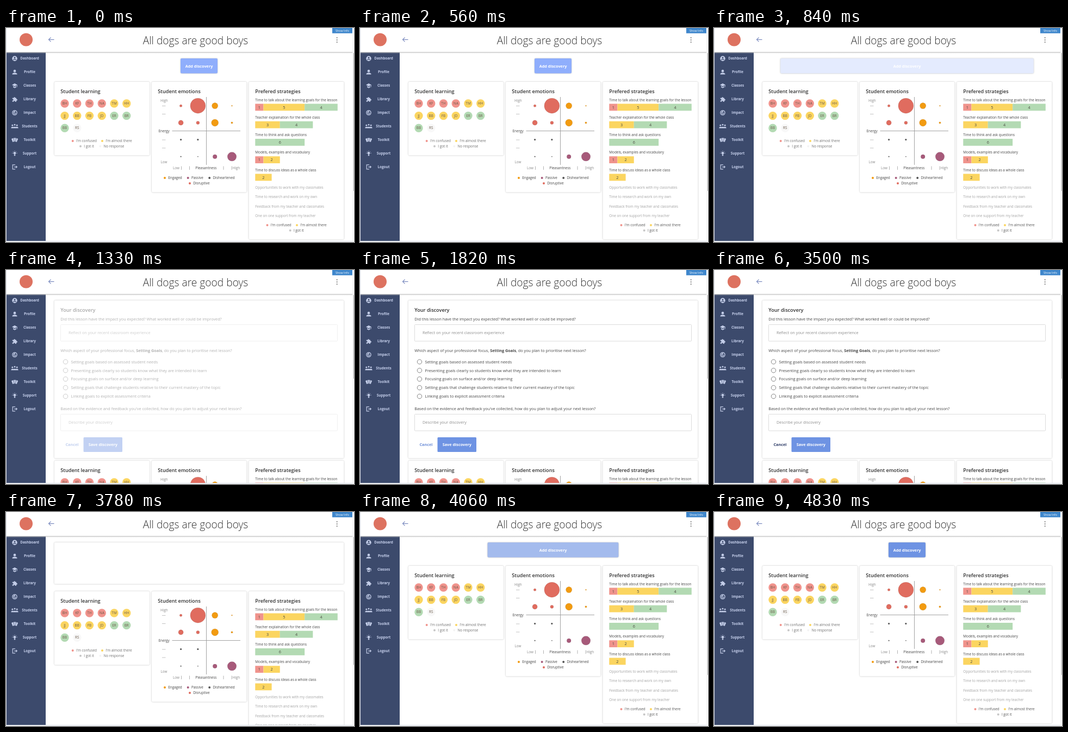
An HTML page for the animation above (4.9 s loop, 640 px wide and 394 px high).

```html
<!DOCTYPE html>
<html lang="en">
<head>
<meta charset="utf-8">
<title>Lesson discovery</title>
<style>
  html, body { margin: 0; width: 100%; height: 100%; overflow: hidden; background: #fff; }
  svg { display: block; width: 640px; height: 394px; }
  text { font-family: "Open Sans", sans-serif; }
  .card { fill: #fff; filter: drop-shadow(0 .7px .9px rgba(0, 0, 0, .28)); }
  .icon * { fill: none; stroke: #c3cde8; stroke-width: 1.2; }
  .icon .solid { fill: #c3cde8; stroke: none; }
</style>
</head>
<body>
<svg id="stage" viewBox="0 0 640 394">
  <defs>
    <clipPath id="page"><rect x="73" y="44" width="565" height="348"/></clipPath>
    <linearGradient id="edge" x2="0" y2="1">
      <stop stop-color="#c4c4c4"/><stop offset="1" stop-color="#c4c4c4" stop-opacity="0"/>
    </linearGradient>
  </defs>
</svg>
<script>
const RED = '#f0938c', YELLOW = '#fbd560', GREEN = '#b3dab3';
const CORAL = '#e06c5f', ORANGE = '#f29b11', PLUM = '#a75a7a', DARK = '#555';
const IDLE = [110, 147, 227], HOVER = [143, 174, 252];

// Text is placed by the middle of its capitals.
const text = (x, y, str, { size = 6.4, fill = '#464646', weight = 400, anchor = 'start', id = '' } = {}) =>
  `<text x="${x}" y="${y + size * .357}" font-size="${size}" fill="${fill}" font-weight="${weight}"
    text-anchor="${anchor}" ${id && `id="${id}"`}>${str}</text>`;
const heading = (x, y, str) => text(x, y, str, { size: 9.143, weight: 600, fill: '#303030' });
const formText = (x, y, str, fill = '#464646') => text(x, y, str, { size: 7.314, fill });
const buttonText = (x, y, str, fill, id) =>
  text(x, y, str, { size: 7.314, weight: 700, anchor: 'middle', fill, id });
const circle = (x, y, r, fill, extra = '') => `<circle cx="${x}" cy="${y}" r="${r}" fill="${fill}" ${extra}/>`;
const rect = (x, y, w, h, fill, extra = '') =>
  `<rect x="${x}" y="${y}" width="${w}" height="${h}" fill="${fill}" ${extra}/>`;
const line = (x1, y1, x2, y2, color) => `<path d="M${x1} ${y1}L${x2} ${y2}" stroke="${color}" stroke-width=".9"/>`;
const card = (x, y, w, h) => `<rect class="card" x="${x}" y="${y}" width="${w}" height="${h}" rx="2"/>`;
const legend = (x, y, color, str, fill = '#6f6f6f') => circle(x, y, 2, color) + text(x + 6.2, y, str, { fill });

function learningCard() {
  const rows = ['BH KF TH NA TM HH', 'JJ BB FB JD ER BR', 'BB RS'];
  const students = rows.flatMap((row, r) => row.split(' ').map((name, c) => {
    const index = r * 6 + c;
    const color = index < 4 ? RED : index < 10 ? YELLOW : index < 13 ? GREEN : '#f8f8f8';
    const x = 108 + c * 22.75, y = 139 + r * 22.6;
    return circle(x, y, 7.7, color) + text(x, y, name, { anchor: 'middle', fill: '#6b5a4a' });
  }));
  return card(89, 99, 175, 135.5) + heading(100.3, 117, 'Student learning') + students.join('') +
    legend(122.7, 208, RED, 'I\'m confused') + legend(177, 208, YELLOW, 'I\'m almost there') +
    legend(137, 217.7, '#c6c6c6', 'I got it') + legend(173.3, 217.7, '#f4f4f4', 'No response');
}

function emotionsCard() {
  const bubbles = [
    [CORAL, 2.3, CORAL, 14, ORANGE, 5.6, ORANGE, 1],
    [CORAL, 4.6, CORAL, 3, ORANGE, 6.5, ORANGE, 1.7],
    [DARK, 1.5, DARK, 1.5],
    [DARK, 1, DARK, .8, PLUM, 3.9, PLUM, 8.3]
  ].map((row, r) => [0, 1, 2, 3].filter(c => row[c * 2]).map(c =>
    circle(321.6 + c * 31.3, 143.2 + r * 31.2, row[c * 2 + 1], row[c * 2], 'stroke="#0003" stroke-width=".4"')).join(''));
  const gray = { fill: '#8a8a8a' };
  return card(268, 99, 174.5, 203.5) + heading(279.3, 117, 'Student emotions') +
    line(368.5, 127, 368.5, 252, '#999') + line(305.5, 189.5, 431, 189.5, '#999') +
    [143.5, 158.5, 206, 221].map(y => line(287, y, 293.5, y, '#bbb')).join('') +
    [322.5, 337.5, 400, 415].map(x => line(x, 254.5, x, 261, '#aaa')).join('') +
    text(284, 133.5, 'High', gray) + text(280.5, 189.5, 'Energy') + text(284.5, 246.5, 'Low', gray) +
    text(307, 258, 'Low', gray) + text(367.8, 258, 'Pleasantness', { anchor: 'middle' }) + text(416.5, 258, 'High', gray) +
    bubbles.join('') +
    legend(292, 276, ORANGE, 'Engaged', '#444') + legend(334.7, 276, PLUM, 'Passive', '#444') +
    legend(374.2, 276, DARK, 'Disheartened', '#444') + legend(338, 286, CORAL, 'Disruptive', '#444');
}

function strategiesCard() {
  const unit = 15.15;
  const bars = [
    ['Time to talk about the learning goals for the lesson', [1, RED], [5, YELLOW], [4, GREEN]],
    ['Teacher explaination for the whole class', [3, YELLOW], [4, GREEN]],
    ['Time to think and ask questions', [6, GREEN]],
    ['Models, examples and vocabulary', [1, RED], [2, YELLOW]],
    ['Time to discuss ideas as a whole class', [2, YELLOW]]
  ].map(([label, ...parts], i) => {
    const y = 132.3 + i * 32.25;
    let x = 458.3, out = text(x, y, label);
    for (const [count, color] of parts) {
      const w = count * unit;
      out += rect(x, y + 7.2, w, 12.8, color) +
        text(x + w / 2, y + 13.8, count, { size: 7.314, anchor: 'middle', fill: '#4a4a40' });
      x += w;
    }
    return out;
  });
  const unused = ['Opportunities to work with my classmates', 'Time to research and work on my own',
    'Feedback from my teacher and classmates', 'One on one support from my teacher'];
  return card(446.5, 99, 175, 290) + heading(458.3, 117, 'Prefered strategies') + bars.join('') +
    unused.map((label, i) => text(458.3, 293.8 + i * 17.25, label, { fill: '#a3a3a3' })).join('') +
    legend(480.5, 363, RED, 'I\'m confused', '#555') + legend(535, 363, YELLOW, 'I\'m almost there', '#555') +
    legend(522.7, 372.8, '#c6c6c6', 'I got it', '#555');
}

function form() {
  const options = ['Setting goals based on assessed student needs',
    'Presenting goals clearly so students know what they are intended to learn',
    'Focusing goals on surface and/or deep learning',
    'Setting goals that challenge students relative to their current mastery of the topic',
    'Linking goals to explicit assessment criteria'];
  const field = (y, hint, id) =>
    rect(100.5, y, 509, 30.5, '#fff', `id="${id}" rx="1" stroke="#dcdcdc"`) + formText(115, y + 15.2, hint, '#8c8c8c');
  return heading(100.3, 73.7, 'Your discovery') +
    formText(100.3, 90.3, 'Did this lesson have the impact you expected? What worked well or could be improved?') +
    field(100.5, 'Reflect on your recent classroom experience', 'reflection') +
    formText(100.3, 148.5, 'Which aspect of your professional focus, <tspan font-weight="700">Setting Goals</tspan>, do you plan to prioritise next lesson?') +
    options.map((label, i) => circle(109.5, 169 + i * 15.9, 4.2, 'none', 'stroke="#777" stroke-width=".9"') +
      formText(119.5, 169 + i * 15.9, label)).join('') +
    formText(100.3, 255.1, 'Based on the evidence and feedback you\'ve collected, how do you plan to adjust your next lesson?') +
    field(265.5, 'Describe your discovery', 'plan') +
    buttonText(121.5, 321.5, 'Cancel', '#6e8fd8', 'cancel') +
    rect(142.5, 308, 71.5, 27, `rgb(${IDLE})`, 'rx="1.5"') + buttonText(178.3, 321.5, 'Save discovery', '#fff');
}

function sidebar() {
  // Each icon is centred on 0,0.
  const solid = d => `<path class="solid" d="${d}"/>`;
  const dot = (x, y, r) => `<circle class="solid" cx="${x}" cy="${y}" r="${r}"/>`;
  const items = {
    Dashboard: dot(0, 0, 4.7) + '<circle r="1.5" cy="-1.4" style="fill:#3c4a6c;stroke:none"/><path d="M-2.7 2.6Q0 .2 2.7 2.6" style="stroke:#3c4a6c"/>',
    Profile: dot(0, -2, 2.3) + solid('M-4.3 4.3V3Q-3.5 1 0 1T4.3 3V4.3Z'),
    Classes: solid('M-5-1.3L0-4 5-1.3 0 1.4ZM-3 1V3L0 4.6 3 3V1L0 2.6ZM4.3-1H5V2.6H4.3Z'),
    Library: solid('M-4.3-2.4H-1.7A1.3 1.3 0 1 1 1-2.4H3V0A1.3 1.3 0 1 1 3 2.4V4.6H.8A1.3 1.3 0 1 0-2 4.6H-4.3V2.2A1.3 1.3 0 1 0-4.3-.2Z'),
    Impact: '<path d="M0-4.2A4.2 4.2 0 1 0 4.2 0M0-2.1A2.1 2.1 0 1 0 2.1 0M0 0V-4.2A4.2 4.2 0 0 1 4.2 0"/>',
    Students: [-4.2, 0, 4.2].map(x => dot(x, -1.8 - !x, 1.4)).join('') + solid('M-6.5 3.5V2Q-4.2 0-2.3 1.4 0 .2 2.3 1.4 4.2 0 6.5 2V3.5Z'),
    Toolkit: solid('M-6-2L-2.5-3.2-1 3-3.8 4ZM-1.8-3.5H2.2L1.2 3.3H-.3ZM3-3.2L6.2-1.8 3.7 4 1.7 3.3Z'),
    Support: dot(0, -.5, 2.4) + solid('M-1.2 2H1.2V4.5H-1.2Z') + '<path d="M0-5V-3.8M-4.8-.5H-3.5M3.5-.5H4.8M-3.4-3.9L-2.6-3.1M3.4-3.9L2.6-3.1" style="stroke-width:.9"/>',
    Logout: '<path d="M1-4H-3.8V4H1M-1 0H4.2M2.3-2L4.3 0 2.3 2"/>'
  };
  return rect(1, 45, 72, 347, '#3c4a6c') + Object.entries(items).map(([label, icon], i) =>
    `<g class="icon" transform="translate(16 ${56.2 + i * 24.95})">${icon}</g>` +
    text(43.5, 56.2 + i * 24.95, label, { weight: 700, anchor: 'middle', fill: '#c6d0ec' })).join('');
}

const header = rect(1, 1, 636, 43.5, '#fff') + rect(1, 44, 636, 3, 'url(#edge)') +
  circle(37, 21.5, 12, '#dd7260') +
  '<path d="M88.5 21.3H78.5M82.5 17.3L78.5 21.3 82.5 25.3" fill="none" stroke="#7c8cc0" stroke-width="1.2"/>' +
  text(348.5, 23, 'All dogs are good boys', { size: 19.2, weight: 300, anchor: 'middle', fill: '#333' }) +
  [18, 22, 26].map(y => circle(608.7, y, 1.1, '#777')).join('') +
  rect(600, 0, 37, 9.7, '#3f87cc') +
  text(618.5, 4.6, 'Show Info', { size: 5.4, anchor: 'middle', fill: '#fff' });

document.getElementById('stage').innerHTML +=
  `<g clip-path="url(#page)">
    <g id="cards">${learningCard()}${emotionsCard()}${strategiesCard()}</g>
    <rect id="panel" class="card" y="56" rx="2"/>
    ${buttonText(355, 70, 'Add discovery', '#fff', 'add')}
    <g id="form">${form()}</g>
  </g>` + sidebar() + header +
  line(.5, 0, .5, 392, '#dfe4ec') + line(0, 392.5, 638, 392.5, '#d9dfe7') + line(637.5, 10, 637.5, 392, '#eee') +
  rect(639, 46, 1, 254, '#b0b0b0', 'id="thumb"');

const LOOP = 4900;
const [cards, panel, add, formGroup, plan, cancel, thumb] =
  ['cards', 'panel', 'add', 'form', 'plan', 'cancel', 'thumb'].map(id => document.getElementById(id));
const set = (node, attrs) => Object.entries(attrs).forEach(([key, value]) => node.setAttribute(key, value));
const mix = (a, b, p) => a + (b - a) * p;
const ease = (t, from, to) => {
  const p = Math.min(1, Math.max(0, (t - from) / (to - from)));
  return p * p * (3 - 2 * p);
};

function draw(t) {
  const widen = ease(t, 567, 927) - ease(t, 3850, 4210);
  const whiten = ease(t, 567, 970) - ease(t, 3850, 4210);
  const open = ease(t, 920, 1270) - ease(t, 3600, 3850);
  const shown = ease(t, 1220, 1470) - ease(t, 3520, 3640);
  const width = mix(68, 532.5, widen);
  const color = (t < 2000 ? HOVER : IDLE).map(c => Math.round(mix(c, 255, whiten)));
  set(panel, { x: 355 - width / 2, width, height: mix(27.5, 290.5, open), style: `fill:rgb(${color})` });
  set(add, { opacity: open > 0 ? 0 : 1 });
  set(cards, { transform: `translate(0 ${252 * open})` });
  set(formGroup, { opacity: shown });
  set(plan, { stroke: t >= 2380 && t < 2800 ? '#5c5c5c' : '#dcdcdc' });
  set(cancel, { fill: t >= 2900 && t < 3640 ? '#2d3b66' : '#6e8fd8' });
  set(thumb, { height: mix(254, 154, open) });
}

const start = performance.now();
(function tick() {
  draw((performance.now() - start) % LOOP);
  requestAnimationFrame(tick);
})();
</script>
</body>
</html>
```
